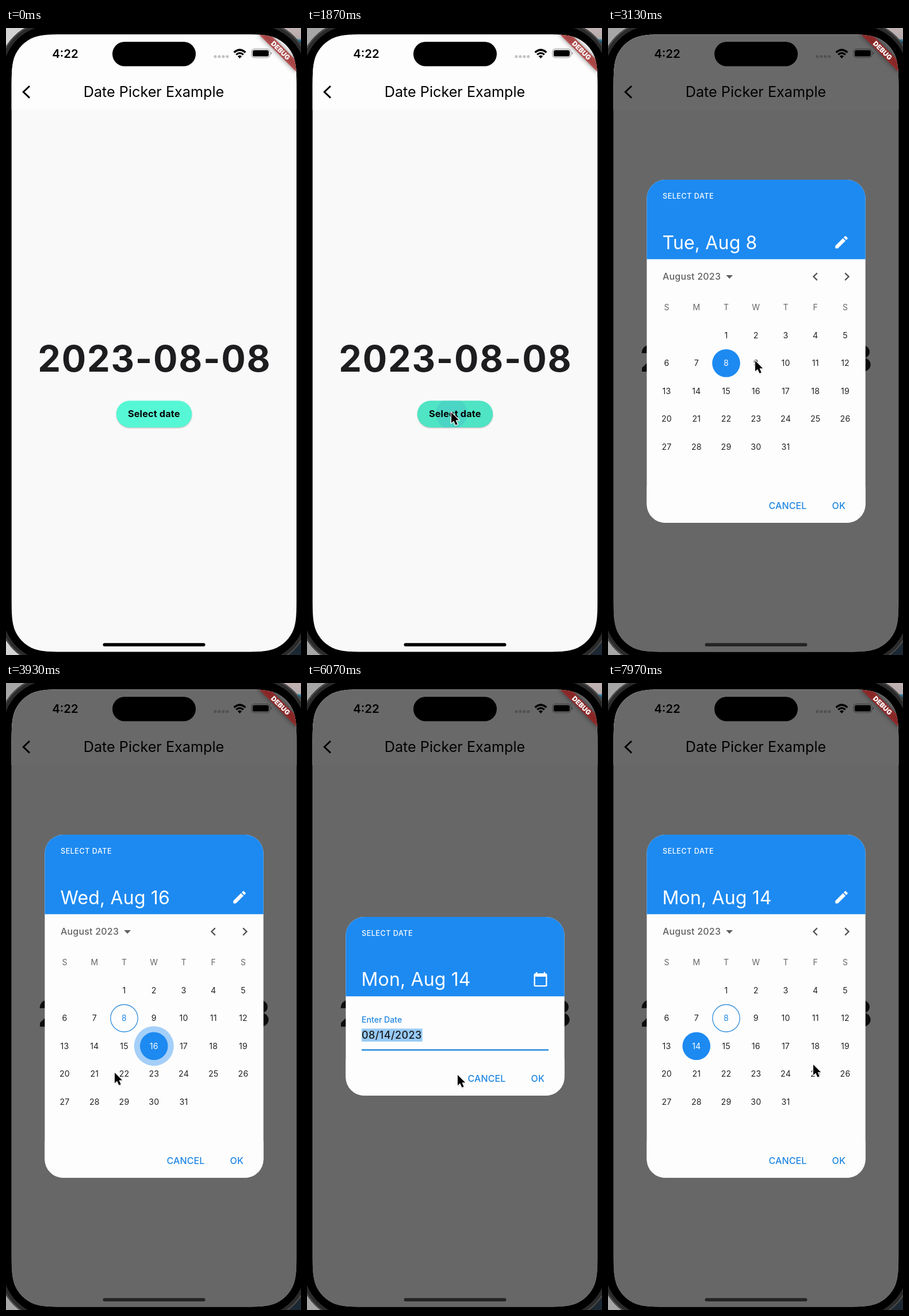
These frames come from a looping animation (513 by 1091 pixels, 8 s). An HTML page:

```html
<!DOCTYPE html>
<html lang="en">
<head>
<meta charset="utf-8">
<title>Date Picker Example</title>
<style>
  html, body { margin: 0; width: 100%; height: 100%; overflow: hidden; background: #000; }
  svg { display: block; width: 513px; height: 1091px; }
  text { font-family: Inter, Roboto, "Liberation Sans", sans-serif; font-optical-sizing: none; white-space: pre; }
</style>
</head>
<body>
<svg id="stage" viewBox="0 0 513 1091" xmlns="http://www.w3.org/2000/svg"></svg>
<script>
const LOOP = 8000;
const BLUE = '#1d8af1', LINK = '#1f86e2', PAPER = '#fdfdfd';
const TALL = 596.8, SHORT = 311, MID = 562.5;
const OPEN = 1900, TO_INPUT = 5240, TO_CALENDAR = 7400;

const label = (x, y, size, str, o = {}) =>
  `<text x="${x}" y="${y}" font-size="${size}" font-weight="${o.w || 400}" fill="${o.fill || '#000'}"
    letter-spacing="${o.ls || 0}" text-anchor="${o.at || 'start'}" ${o.id ? `id="${o.id}"` : ''}>${str}</text>`;
const box = (x, y, w, h, r, fill, more = '') =>
  `<rect x="${x}" y="${y}" width="${w}" height="${h}" rx="${r}" fill="${fill}" ${more}/>`;
const line = (d, color, width, more = '') =>
  `<path d="${d}" fill="none" stroke="${color}" stroke-width="${width}" ${more}/>`;

// Rectangle with continuous-curvature corners.
function smoothBox(x, y, w, h, r) {
  const half = [[0, 1.529], [0, 1.088], [0, .868], [.075, .631], [.169, .373]];
  const corner = [...half, ...half.slice(1).reverse().map(([a, b]) => [b, a]), [1.529, 0]];
  const mirror = (fx, fy) => corner.map(([a, b]) =>
    [fx ? x + w - a * r : x + a * r, fy ? y + h - b * r : y + b * r]);
  const runs = [mirror(0, 0), mirror(1, 0).reverse(), mirror(1, 1), mirror(0, 1).reverse()];
  return `<path d="M${runs.map(([p, ...rest]) => `${p}C${rest.join(' ')}`).join('L')}Z"/>`;
}

const dayX = col => 102 + col * 51.75;
const dayY = row => 534.8 + row * 48.45;
const dayPos = n => [dayX((n + 1) % 7), dayY(Math.floor((n + 1) / 7))];

function phone() {
  return `
  ${box(0, 0, 256, 1091, 0, '#d4d4d4', 'id="desk"')}
  ${box(256, 0, 257, 1091, 0, 'url(#deskRight)')}
  ${box(-14, -13, 543, 1123, 94, '#2b2b2b')}
  ${box(-12.5, -11.5, 540, 1120, 92.5, 'none', 'stroke="#555" stroke-width="1.5"')}
  ${box(-6, -5, 527, 1107, 86, '#000')}`;
}

function statusBar() {
  const dots = [0, 1, 2, 3].map(i =>
    box(361.3 + i * 7, 47.3, 5, 5, 2, '#c3c3c3')).join('');
  return `
  ${label(103, 51.8, 20.5, '4:22', { w: 600, at: 'middle' })}
  ${box(185, 24, 145, 42.5, 21.2, '#000')}
  ${dots}
  ${line('M396.6 42.6Q406.5 33.6 416.4 42.6', '#000', 3.4)}
  ${line('M400.2 46.4Q406.5 40.8 412.8 46.4', '#000', 3.2)}
  <path d="M406.5 53l-3.7-4.1q3.7-3 7.4 0z"/>
  ${box(426.9, 36.4, 32, 15.2, 5, 'none', 'stroke="#a8a8a8" stroke-width="1.3"')}
  ${box(428.9, 38.4, 28, 11.2, 3.2, '#000')}
  <path d="M460.4 41.5q2.2 .6 2.2 2.5t-2.2 2.5z" fill="#a8a8a8"/>`;
}

function page() {
  return `
  ${box(9, 11, 497, 1075, 0, '#f9f9f9')}
  ${box(9, 11, 497, 131.5, 0, PAPER)}
  ${statusBar()}
  ${line('M41 101L30.2 111.3L41 121.6', '#000', 2.9)}
  ${label(257, 120.3, 25.2, 'Date Picker Example', { at: 'middle' })}
  ${label(258.3, 598, 63, '2023-08-08', { at: 'middle', w: 700, ls: 1.75, fill: '#1d1d1f' })}
  ${box(192, 650, 131.2, 46, 23, '#000', 'opacity=".28" filter="url(#soft)"')}
  ${box(191.8, 648.5, 131.4, 46.5, 23.2, '#56f7d5')}
  <g clip-path="url(#button)">
    ${box(191, 648, 133, 48, 0, '#000', 'id="hover" opacity="0"')}
    <circle id="ripple" cx="251.5" cy="671" fill="#3c96c8"/>
  </g>
  ${label(257.3, 677.4, 16.3, 'Select date', { at: 'middle', w: 700, ls: .15 })}`;
}

function calendar() {
  const heads = [...'SMTWTFS'].map((c, i) =>
    label(dayX(i), 491.4, 14, c, { at: 'middle', fill: '#676767' })).join('');
  const days = Array.from({ length: 31 }, (_, i) => {
    const [x, y] = dayPos(i + 1);
    return label(x, y + 5, 14.2, i + 1, { at: 'middle', ls: .15, fill: '#222', id: 'day' + (i + 1) });
  }).join('');
  const [tx, ty] = dayPos(8);
  return `
  ${label(95, 438.4, 16, 'August 2023', { w: 500, ls: .2, fill: '#626262' })}
  <path d="M205.3 430h11.8l-5.9 6.2z" fill="#5f5f5f"/>
  ${line('M363.8 426.4L357.4 432.6L363.8 438.8', '#555', 2.3)}
  ${line('M412.2 426.4L418.6 432.6L412.2 438.8', '#555', 2.3)}
  ${heads}
  <circle id="splash" fill="${BLUE}"/>
  <circle id="today" cx="${tx}" cy="${ty}" r="23.7" fill="none" stroke="#3b94de" stroke-width="1.4"/>
  <circle id="pick" r="24.3" fill="${BLUE}"/>
  ${days}`;
}

function entry() {
  return `
  ${label(95, 448, 14.1, 'Enter Date', { w: 500, fill: LINK })}
  ${box(95, 458.5, 105.7, 22.5, 0, '#97caf6')}
  ${label(95, 476, 18, '08/14/2023', { w: 500, ls: .4, fill: '#1b1b1b' })}
  ${box(95, 494.4, 325, 2.4, 0, LINK)}`;
}

// Head and bodies are laid out from the tall dialog's top edge (264), the buttons from its bottom (861).
function dialog() {
  return `
  <g id="dialog" clip-path="url(#sheet)">
    ${box(67, 200, 381, 720, 0, PAPER)}
    <g id="head">
      ${box(67, 263, 381, 139.3, 0, BLUE)}
      ${label(95, 296.7, 12.6, 'SELECT DATE', { w: 500, ls: .5, fill: '#fff' })}
      ${label(94.5, 384.5, 32, '', { ls: .15, fill: '#fff', id: 'title' })}
      <path id="pencil" transform="translate(391.7 358.4) scale(1.2)" fill="#fff" d="M3 17.25V21h3.75L17.81 9.94l-3.75-3.75zM20.71 7.04a1 1 0 0 0 0-1.41l-2.34-2.34a1 1 0 0 0-1.41 0l-1.83 1.83 3.75 3.75z"/>
      <path id="sheetIcon" transform="translate(392.2 358.9) scale(1.152)" fill="#fff" d="M20 3h-1V1h-2v2H7V1H5v2H4c-1.1 0-2 .9-2 2v16c0 1.1.9 2 2 2h16c1.1 0 2-.9 2-2V5c0-1.1-.9-2-2-2zm0 18H4V8h16z"/>
      <g id="calendar">${calendar()}</g>
      <g id="entry">${entry()}</g>
    </g>
    <g id="actions">
      ${box(67, 797, 381, 66, 0, PAPER)}
      ${label(312.5, 837.3, 16, 'CANCEL', { at: 'middle', w: 500, ls: .1, fill: LINK })}
      ${label(401.3, 837.3, 16, 'OK', { at: 'middle', w: 500, ls: .1, fill: LINK })}
    </g>
  </g>`;
}

function banner() {
  return `
  <g transform="translate(477.5 39.2) rotate(45)">
    ${box(-46, -6.9, 92, 13.8, 0, '#000', 'opacity=".5" filter="url(#blur)"')}
    ${box(-46, -6.9, 92, 13.8, 0, '#b71c1c', 'opacity=".63"')}
    ${label(0, 4.2, 11.75, 'DEBUG', { at: 'middle', w: 900, fill: '#fff' })}
  </g>`;
}

const ARROW = 'M0 0V18.2L4.2 14.4L7.4 21.8L10.7 20.4L7.6 13.2H13.2Z';

document.getElementById('stage').innerHTML = `
<defs>
  <linearGradient id="deskRight" x2="0" y2="1">
    <stop offset="0" stop-color="#c3b4b4"/><stop offset=".017" stop-color="#b5aaaa"/>
    <stop offset=".019" stop-color="#2f83a6"/><stop offset=".024" stop-color="#2d4655"/>
    <stop offset="1" stop-color="#1b2833"/>
  </linearGradient>
  <filter id="blur" x="-30%" y="-150%" width="160%" height="400%"><feGaussianBlur stdDeviation="4"/></filter>
  <filter id="soft" x="-10%" y="-20%" width="120%" height="140%"><feGaussianBlur stdDeviation="1"/></filter>
  <clipPath id="screen">${smoothBox(9.7, 11.3, 495.5, 1074.2, 63.4)}</clipPath>
  <clipPath id="button">${box(191.8, 648.5, 131.4, 46.5, 23.2, '#000')}</clipPath>
  <clipPath id="sheet"><rect id="sheetShape" x="67.4" width="380.3" rx="32.3"/></clipPath>
</defs>
${phone()}
<g clip-path="url(#screen)">
  ${page()}
  ${box(9, 11, 497, 1075, 0, '#000', 'id="dim"')}
  ${dialog()}
  ${box(168.5, 1070.2, 178, 5.8, 2.9, '#000', 'id="homeBar"')}
  ${banner()}
</g>
<g id="ring" fill="none">
  <circle r="27.3" stroke="#fff" stroke-width="4.4" opacity=".85"/>
  <circle r="27.3" stroke="#000" stroke-width="2"/>
</g>
<g id="cursor">
  <path d="${ARROW}" transform="translate(.5 1.5)" opacity=".3" filter="url(#soft)"/>
  <path d="${ARROW}" stroke="#fff" stroke-width="2.6" stroke-linejoin="round"/>
  <path d="${ARROW}"/>
</g>`;

const el = {};
document.querySelectorAll('[id]').forEach(n => el[n.id] = n);
const set = (id, attrs) => { for (const k in attrs) el[id].setAttribute(k, attrs[k]); };
const move = (id, x, y) => set(id, { transform: `translate(${x} ${y})` });
const show = (id, on) => { el[id].style.display = on ? '' : 'none'; };
const span = (t, a, b) => Math.min(1, Math.max(0, (t - a) / (b - a)));
const ease = p => p * p * (3 - 2 * p);

// time, x, y of the pointer tip
const PATH = [
  [800, 545, 780], [1500, 251, 669], [2150, 251, 669], [2800, 262, 590], [3130, 256, 579],
  [3480, 256, 630], [3720, 256, 630], [3930, 189, 678], [4300, 150, 630], [4560, 150, 630],
  [5060, 413, 381], [5420, 413, 381], [6070, 262, 682], [6500, 292, 652], [7150, 406, 514],
  [7480, 406, 514], [7900, 357, 664], [8000, 357, 664]
];
// selected day: time, day, title
const PICKS = [[0, 8, 'Tue, Aug 8'], [3660, 16, 'Wed, Aug 16'], [4500, 14, 'Mon, Aug 14']];
const PRESSES = [[1720, 1840], [3560, 3660], [4400, 4500], [5100, 5230], [7290, 7390]];

function pointer(t) {
  const i = PATH.findIndex(p => p[0] > t);
  if (i < 1) return PATH[0].slice(1);
  const [a, ax, ay] = PATH[i - 1], [b, bx, by] = PATH[i];
  const p = ease(span(t, a, b));
  return [ax + (bx - ax) * p, ay + (by - ay) * p];
}

function drawDays(t) {
  const [since, day, title] = PICKS.filter(p => p[0] <= t).pop();
  const [x, y] = dayPos(day);
  if (el.title.textContent !== title) el.title.textContent = title;
  set('pick', { cx: x, cy: y });
  show('today', day !== 8);
  for (const [, n] of PICKS) set('day' + n, { fill: n === day ? '#fff' : n === 8 ? LINK : '#222' });
  set('splash', {
    cx: x, cy: y,
    r: since ? 15 + 19.5 * span(t, since - 60, since + 170) : 0,
    opacity: .4 * (1 - span(t, since + 270, since + 450))
  });
}

function drawDialog(t) {
  const fade = 1 - (1 - span(t, OPEN, OPEN + 160)) ** 2;
  const typing = t >= TO_INPUT && t < TO_CALENDAR;
  const shrink = span(t, TO_INPUT, TO_INPUT + 210) ** 2 - span(t, TO_CALENDAR, TO_CALENDAR + 210) ** 2;
  const h = TALL + (SHORT - TALL) * shrink, shift = (TALL - h) / 2;
  set('dim', { opacity: .586 * fade });
  set('dialog', { opacity: fade });
  set('sheetShape', { y: MID - h / 2, height: h });
  move('head', 0, shift);
  move('actions', 0, -shift);
  for (const id of ['calendar', 'pencil']) show(id, !typing);
  for (const id of ['entry', 'sheetIcon']) show(id, typing);
  const g = Math.round(36 * fade);
  set('homeBar', { fill: `rgb(${g},${g},${g})` });
}

function draw(t) {
  const [x, y] = pointer(t);
  set('desk', { fill: t < 760 ? '#d4d4d4' : '#a6a6a6' });
  move('cursor', x, y);
  move('ring', x, y + 2.5);
  show('ring', PRESSES.some(([a, b]) => t >= a && t < b));

  const over = x > 192 && x < 323 && y > 648 && y < 695 && t < 2100;
  set('hover', { opacity: over ? .08 : 0 });
  set('ripple', {
    r: t < 1720 ? 0 : 10 + 17 * span(t, 1720, 1870) + 42 * span(t, 1870, 2050),
    opacity: .2 * (1 - span(t, 2000, 2200))
  });
  drawDialog(t);
  drawDays(t);
}

function tick() {
  draw(performance.now() % LOOP);
  requestAnimationFrame(tick);
}
tick();
</script>
</body>
</html>
```
